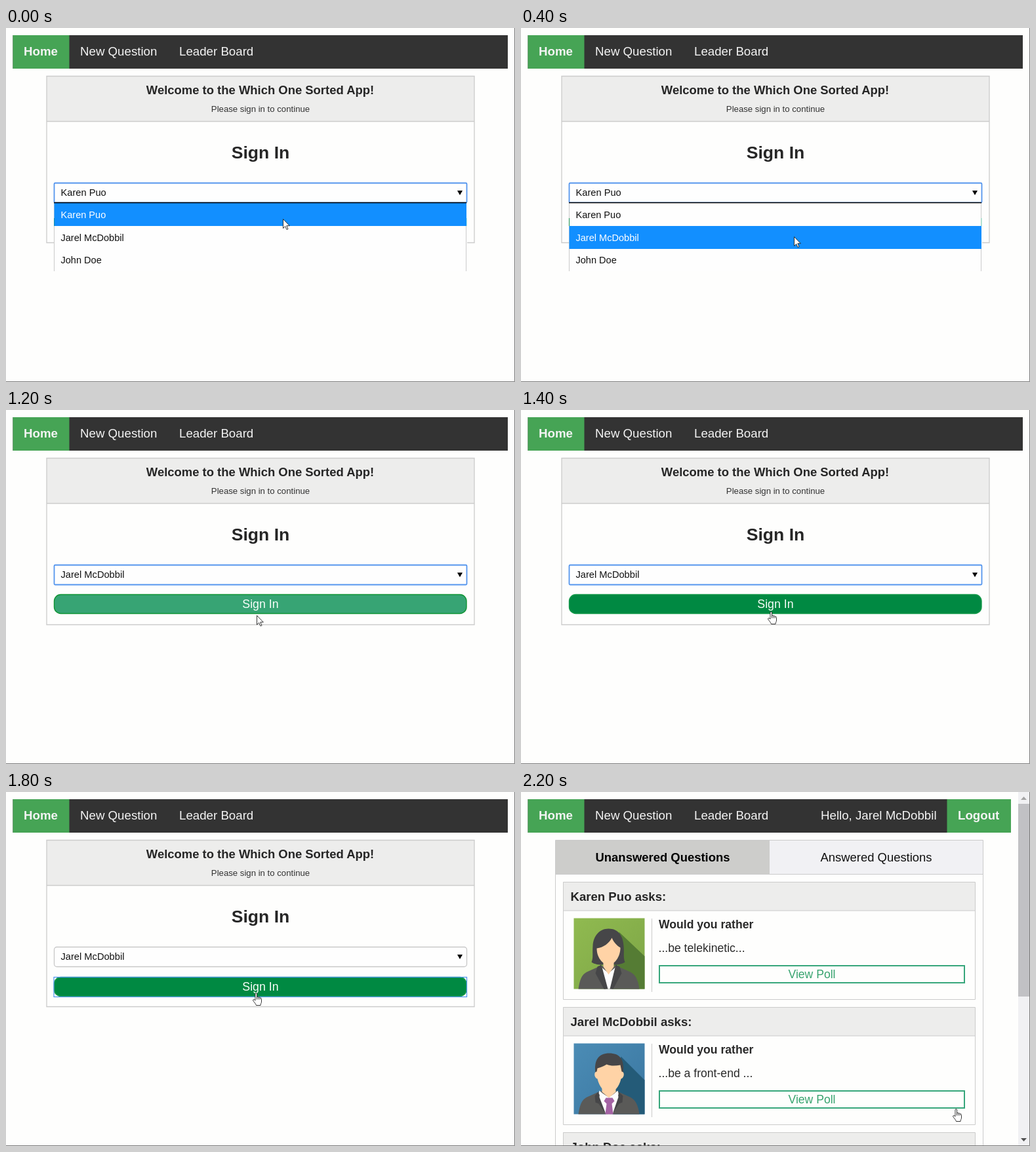
These frames come from a looping animation (776x540 px, 2.4 s). An HTML page:

```html
<!DOCTYPE html>
<html lang="en">
<head>
<meta charset="utf-8">
<title>Sign in</title>
<style>
  html, body { margin: 0; width: 100%; height: 100%; overflow: hidden; background: #fefefd; }
  svg { display: block; width: 776px; height: 540px; font-family: "Liberation Sans", Arial, sans-serif; }
  .nav { font-size: 18.7px; fill: #f4f4f4; }
  .b { font-weight: bold; }
  .mid { text-anchor: middle; }
  .head { font-size: 18.45px; fill: #262626; }
  .body { font-size: 17.6px; fill: #2a2a2a; }
  .field { font-size: 14.67px; fill: #111; }
  .item { font-size: 14.55px; fill: #111; }
  .item.on { fill: #fff; }
  .line { fill: none; stroke: #cbcbcb; }
  .pale { fill: #ededec; }
  .off { display: none; }
</style>
</head>
<body>
<svg viewBox="0 0 776 540">
  <defs>
    <linearGradient id="green" x2="1" y2="1">
      <stop offset="0" stop-color="#90ba50"/><stop offset="1" stop-color="#7da546"/>
    </linearGradient>
    <linearGradient id="blue" x2="1" y2="1">
      <stop offset="0" stop-color="#4b8cb5"/><stop offset="1" stop-color="#3a76a0"/>
    </linearGradient>
    <g id="suit">
      <path fill="#5a5a58" d="M7 108C9 94 12 86 20 82L40 73H66L86 82C94 86 98 94 100 108Z"/>
      <path fill="#fdfdfd" d="M39 72L53 84L67 72L70 84L58 108H49L36 84Z"/>
    </g>
    <g id="woman">
      <path fill="url(#green)" d="M0 0H108V108H0Z"/>
      <path fill="#557c34" d="M69 21L108 58V108H60L60 70Z"/>
      <path fill="#464648" d="M53 16C68 16 75 27 76 42C77 54 75 60 78 67C70 72 60 71 53 71C43 71 34 72 27 67C30 60 28 54 29 42C30 27 39 16 53 16Z"/>
      <use href="#suit"/>
      <path fill="#464648" d="M36 74L42 71L52 108H46L33 84ZM70 74L64 71L55 108H60L73 84Z"/>
      <path fill="#ffd3a6" d="M45 64H61V74L53 86L45 74Z"/>
      <path fill="#ffd3a6" d="M35 46C45 45 54 38 58 30C61 37 66 42 71 45C71 59 62 71 53 71C44 71 35 60 35 46Z"/>
    </g>
    <g id="man">
      <path fill="url(#blue)" d="M0 0H108V108H0Z"/>
      <path fill="#245b78" d="M72 20L108 56V108H60V70Z"/>
      <use href="#suit"/>
      <path fill="#464648" d="M37 74L32 80L33 90L38 92L49 108H53L39 78ZM69 74L75 80L74 90L69 92L58 108H54L68 78Z"/>
      <path fill="#fdfdfd" d="M40 74L53 82L67 74L68 82L59 108H49L39 82Z"/>
      <path fill="#ffd3a6" d="M43 62H64V74L53.500 83L43 74Z"/>
      <path fill="#a463a4" d="M49 83H59L62 88L58 92L60 108H48L50 92L46 88Z"/>
      <path fill="#464648" d="M33 46C30 24 39 15 54 15C69 15 78 23 75 46Z"/>
      <path fill="#ffd3a6" d="M36 38C43 36 47 34 50 32C57 35 64 34 71 33L73 43C78 43 77 53 72 54C69 67 62 74 54 74C46 74 39 67 36 54C31 53 30 43 35 43Z"/>
    </g>
  </defs>

  <path fill="#fefefd" d="M0 0H776V540H0Z"/>

  <g id="login">
    <path fill="#333" d="M10.500 11H765V62H10.500Z"/>
    <rect class="pale" x="62" y="73" width="652" height="70"/>
    <path class="line" stroke-width="1.300" d="M62 73.500H714V327.500H62ZM62 142.500H714"/>
    <text class="head b mid" x="387.500" y="101">Welcome to the Which One Sorted App!</text>
    <text class="mid" x="388" y="128" font-size="13.200" fill="#333">Please sign in to continue</text>
    <text class="b mid" x="388" y="199" font-size="26.600" fill="#262626">Sign In</text>
    <rect id="box" x="73.500" y="236.500" width="629" height="30"/>
    <text id="pick" class="field" x="83.500" y="256"></text>
    <path fill="#000" d="M688 248H696L692 255Z"/>
    <g id="button">
      <rect id="fill" x="73.500" y="281.500" width="628.500" height="29" rx="10" stroke-width="1.400"/>
      <text class="mid" x="388" y="302" font-size="17.800" fill="#f8fdf9">Sign In</text>
    </g>
    <rect id="ring" x="73" y="282.500" width="629.500" height="30" fill="none" stroke="#4a94ee" stroke-width="1.200"/>
    <g id="list">
      <path fill="#fefefe" d="M73 267H703V371H73Z"/>
      <path class="line" d="M73.500 267V371M701.500 267V371"/>
      <path stroke="#1d8f4f" d="M73.500 290V302"/>
      <path stroke="#7edcc0" d="M702 290V302"/>
      <rect id="glow" x="73.500" width="628.500" height="35" fill="#128fff"/>
      <path stroke="#000" stroke-width="1.500" d="M73 266.500H702"/>
    </g>
  </g>

  <g id="home">
    <path fill="#333" d="M10.500 11H747V62H10.500Z"/>
    <path fill="#46a455" d="M649.500 11H747V62H649.500Z"/>
    <text class="nav" x="457" y="42">Hello, Jarel McDobbil</text>
    <text class="nav b" x="666" y="42">Logout</text>
    <path fill="#cdcdcb" d="M53 73H379V125H53Z"/>
    <path fill="#f1f1f4" d="M379 73H705V125H379Z"/>
    <path class="line" d="M52.500 540V73.500H704.500V540M53 125.500H704"/>
    <text class="head b mid" x="216" y="105.500" style="fill:#000">Unanswered Questions</text>
    <text class="head mid" x="541.500" y="105.500" style="fill:#111">Answered Questions</text>
    <g id="cards"></g>
    <path fill="#f1f1f3" d="M758 0H775V540H758Z"/>
    <path fill="#c1c1c4" d="M758 18H775V312H758Z"/>
    <path fill="#a3a3a3" d="M762 12H771L766.500 7Z"/>
    <path fill="#505050" d="M762 528H771L766.500 533Z"/>
  </g>

  <path fill="#46a455" d="M10.500 11H96.500V62H10.500Z"/>
  <text class="nav b" x="27" y="42">Home</text>
  <text class="nav" x="113" y="42">New Question</text>
  <text class="nav" x="264" y="42">Leader Board</text>
  <path fill="none" stroke="#7a7a7a" d="M775.500 0V539.500H0"/>

  <path id="arrow" fill="#fff" stroke="#222" stroke-width=".9" d="M.5 .5V14.500L3.700 11.500L6 16.500L8 15.600L5.800 10.700H10.300Z"/>
  <g id="hand" fill="#fff" stroke="#222" stroke-width=".9" stroke-linejoin="round">
    <path d="M4 12V2C4 .2 6.600 .2 6.600 2V7C7 6 9 6 9 7.500C9.500 6.700 11.300 6.900 11.300 8.300C12 7.600 13.500 8 13.500 9.500V14C13.500 16 12 17 12 19.500H5.500C5 17 1.500 14 .7 12C.2 10.500 2 9.800 3 11Z"/>
    <path d="M6.600 7V10.500M9 7.500V10.500M11.300 8.300V10.500"/>
  </g>
</svg>
<script>
const $ = id => document.getElementById(id);
const people = ["Karen Anu".replace("Anu", "Puo"), "Jarel McDobbil", "John Doe"];

const items = people.map((name, i) => {
  const el = document.createElementNS("http://www.w3.org/2000/svg", "text");
  el.setAttribute("x", 83.5);
  el.setAttribute("y", 290 + Math.round(i * 34.6));
  el.textContent = name;
  $("list").append(el);
  return el;
});

const card = (name, i, face, text) => `
  <g transform="translate(0 ${i * 191})">
    <rect class="pale" x="64" y="137" width="628" height="44"/>
    <path class="line" d="M64.500 137.500H692.500V316.500H64.500ZM64 181H692M199.500 193V305"/>
    <text class="head b" x="75.500" y="165.500" style="font-size:18.600px">${name} asks:</text>
    ${face ? `<use href="#${face}" x="80.500" y="192.500"/>` : ""}
    <text class="body b" x="210" y="208">Would you rather</text>
    <text class="body" x="209.500" y="244">${text}</text>
    <rect x="211" y="265" width="465" height="26" fill="none" stroke="#37a67b" stroke-width="2"/>
    <text class="body mid" x="443.500" y="284" style="fill:#37a36f">View Poll</text>
  </g>`;
$("cards").innerHTML =
  card(people[0], 0, "woman", "...be telekinetic...") +
  card(people[1], 1, "man", "...be a front-end ...") +
  card(people[2], 2, "", "");

// start ms, view, highlighted row, pointer, x, y
const steps = [
  [0, "open", 0, "arrow", 422, 291],
  [200, "open", 1, "arrow", 419, 308],
  [400, "open", 1, "arrow", 416, 318],
  [800, "ready", 1, "arrow", 416, 318],
  [1000, "ready", 1, "arrow", 401, 318],
  [1200, "ready", 1, "arrow", 382, 313],
  [1400, "hover", 1, "hand", 376, 307],
  [1600, "hover", 1, "hand", 376, 306],
  [1800, "pressed", 1, "hand", 376, 306],
  [2000, "home", 1, "arrow", 497, 345],
  [2200, "home", 1, "hand", 658, 483]
];
const loop = 2400;

const show = (id, on) => $(id).classList.toggle("off", !on);
const set = (id, attrs) => {
  for (const k in attrs) $(id).setAttribute(k, attrs[k]);
};

function draw([, view, row, pointer, x, y]) {
  const open = view === "open", pressed = view === "pressed", home = view === "home";
  const lit = pressed || view === "hover";
  show("login", !home);
  show("home", home);
  show("list", open);
  show("button", !open);
  show("ring", pressed);
  $("pick").textContent = people[open ? 0 : 1];
  set("box", {
    fill: "#fefefe", rx: pressed ? 4 : 1.5,
    stroke: pressed ? "#c8c8c8" : "#5596ee", "stroke-width": pressed ? 1.3 : 1.8
  });
  set("fill", { fill: lit ? "#008942" : "#37a474", stroke: lit ? "#14994a" : "#109535" });
  set("button", { transform: `translate(0 ${pressed ? 1 : 0})` });
  set("glow", { y: 267 + row * 35 });
  items.forEach((el, i) => el.setAttribute("class", i === row ? "item on" : "item"));
  for (const id of ["arrow", "hand"]) show(id, id === pointer);
  set(pointer, { transform: `translate(${x} ${y})` });
}

let last;
const start = performance.now();
function tick() {
  const t = (performance.now() - start) % loop;
  const step = steps.findLast(s => s[0] <= t);
  if (step !== last) draw(last = step);
  requestAnimationFrame(tick);
}
tick();
</script>
</body>
</html>
```
